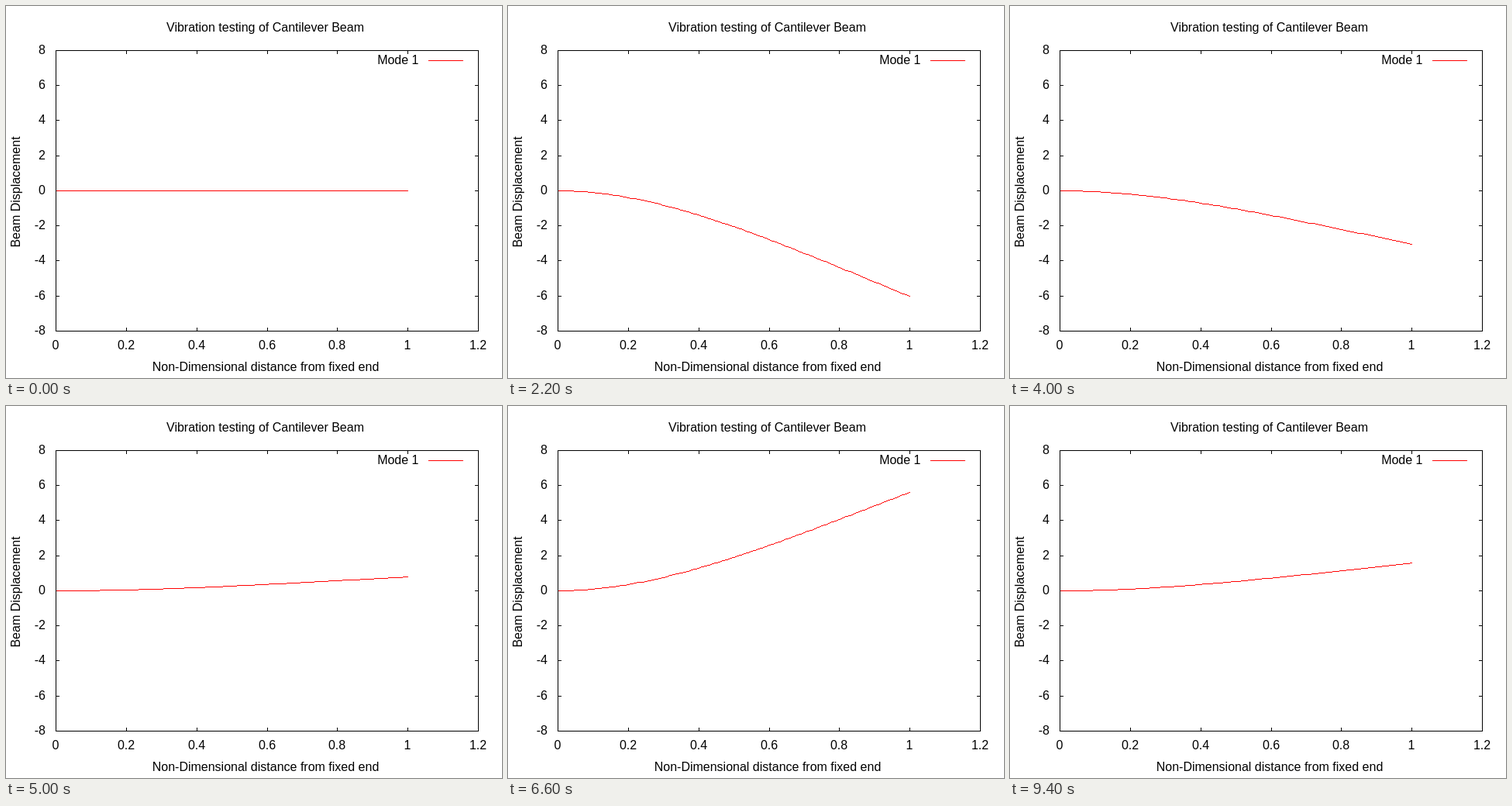
Recreate the animation shown at these times as an HTML page. Size 640 px wide and 480 px high, loop 9600 ms.

```html
<!DOCTYPE html>
<html lang="en">
<head>
<meta charset="utf-8">
<title>Cantilever beam vibration</title>
<style>
  html, body { margin: 0; width: 100%; height: 100%; overflow: hidden; background: #fff; }
  svg { display: block; width: 640px; height: 480px; }
  path { fill: none; stroke: #000; stroke-width: 1; shape-rendering: crispEdges; }
  .red { stroke: #f00; }
  text { font: 16px "Liberation Sans", Arial, sans-serif; fill: #000; }
</style>
</head>
<body>
<svg id="chart" viewBox="0 0 640 480">
  <path id="ticks"/>
  <path id="beam" class="red"/>
  <path d="M64.5 57.5H609.5V419.5H64.5Z"/>
  <path class="red" d="M545 70.5H590"/>
  <text x="334.5" y="33" text-anchor="middle">Vibration testing of Cantilever Beam</text>
  <text x="335" y="471" text-anchor="middle">Non-Dimensional distance from fixed end</text>
  <text transform="translate(18 240) rotate(-90)" text-anchor="middle">Beam Displacement</text>
  <text x="532.5" y="75" text-anchor="end">Mode 1</text>
</svg>
<script>
const STEP_MS = 200, STEPS = 48, HELD_STEP = 39;
const LEFT = 64, RIGHT = 609, TOP = 57, BOTTOM = 419, TICK = 4;
const { abs, sign, sin, cos, sinh, cosh, round, floor, PI } = Math;

const chart = document.getElementById("chart");
const beam = document.getElementById("beam");

const toX = x => round(LEFT + x * (RIGHT - LEFT) / 1.2);
const toY = y => 238 - round(y * (BOTTOM - TOP) / 16);

function addLabel(value, x, y, anchor) {
  const label = document.createElementNS(chart.namespaceURI, "text");
  label.setAttribute("x", x);
  label.setAttribute("y", y);
  label.setAttribute("text-anchor", anchor);
  label.textContent = value;
  chart.append(label);
}

function drawAxes() {
  let d = "";
  for (let i = 0; i <= 6; i++) {
    const x = toX(i / 5);
    d += `M${x + .5} ${BOTTOM}v${-TICK}M${x + .5} ${TOP + 1}v${TICK}`;
    addLabel(i / 5, x, 443, "middle");
  }
  for (let v = -8; v <= 8; v += 2) {
    const y = toY(v);
    d += `M${LEFT + 1} ${y + .5}h${TICK}M${RIGHT} ${y + .5}h${-TICK}`;
    addLabel(v, 51, y + 5, "end");
  }
  document.getElementById("ticks").setAttribute("d", d);
}

// First bending mode of a clamped-free beam
const BETA = 1.875104;
const A = cosh(BETA) + cos(BETA), B = sinh(BETA) - sin(BETA);
function modeShape(x) {
  const b = BETA * x;
  return A * (cosh(b) - cos(b)) - B * (sinh(b) - sin(b));
}
const shape = Array.from({ length: 101 }, (_, i) => modeShape(i / 100));

// One-pixel runs between grid-snapped samples keep the line aliased
function beamPath(amplitude) {
  const points = shape.map((s, i) => [toX(i / 100), toY(s * amplitude)]);
  let d = "", runX = LEFT, runY = points[0][1];
  for (let i = 1; i < points.length; i++) {
    const [x0, y0] = points[i - 1], [x1, y1] = points[i];
    const rise = y1 - y0;
    for (let x = x0 + 1; x <= x1; x++) {
      const y = y0 + sign(rise) * round(abs(rise) * (x - x0) / (x1 - x0));
      if (y !== runY) {
        d += `M${runX} ${runY + .5}H${x}`;
        runX = x;
        runY = y;
      }
    }
  }
  return d + `M${runX} ${runY + .5}H${toX(1) + 1}`;
}

const start = performance.now();
let shown = -1;
function update(now) {
  const step = floor(Math.max(0, now - start) / STEP_MS) % STEPS;
  if (step !== shown) {
    shown = step;
    const phase = step < HELD_STEP ? step : step - 1;
    beam.setAttribute("d", beamPath(-sin(2 * PI * phase / STEPS)));
  }
  requestAnimationFrame(update);
}

drawAxes();
update(start);
</script>
</body>
</html>
```
